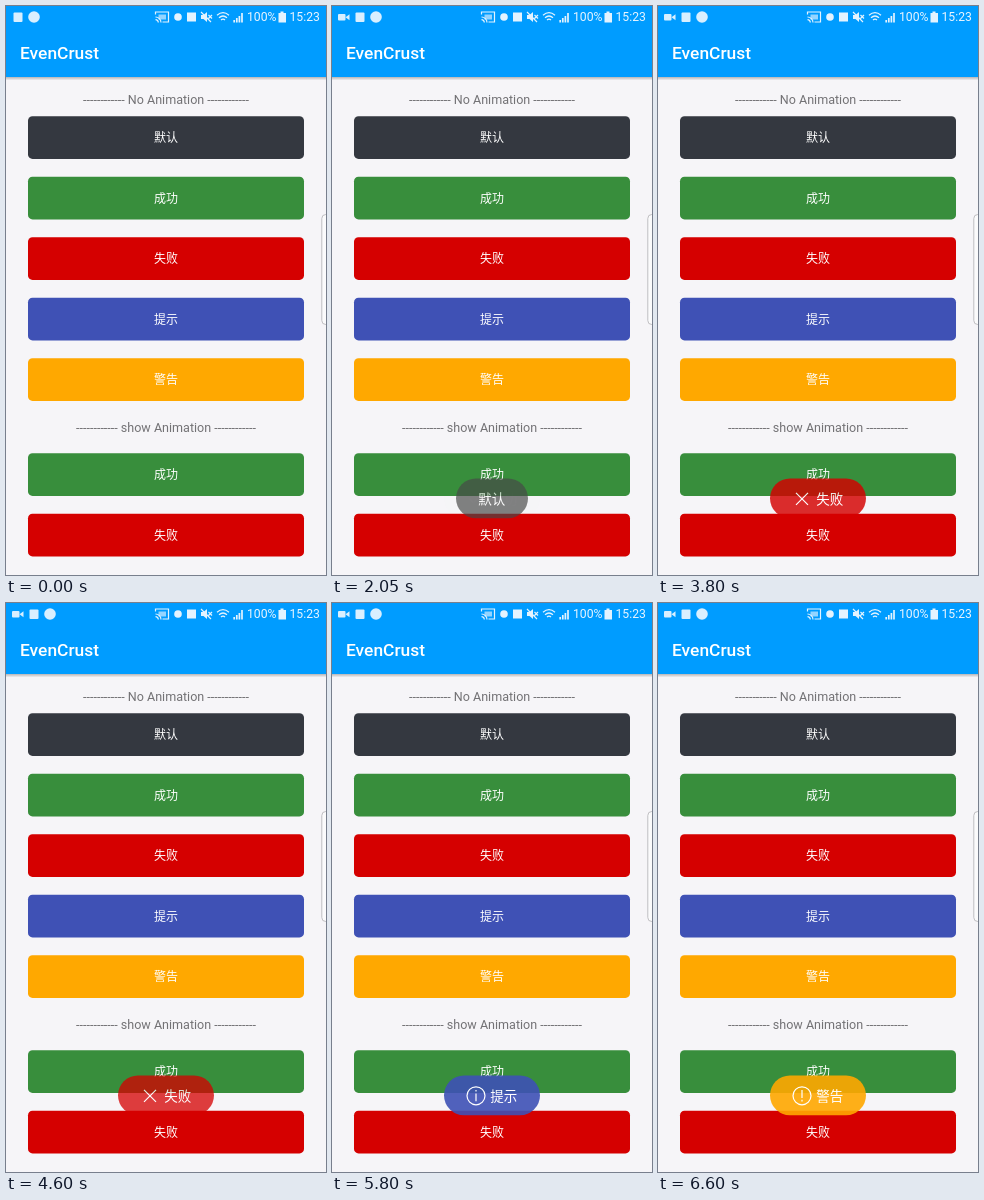
An HTML page for the animation above (6650 ms loop, 320 px wide and 569 px high).

```html
<!DOCTYPE html>
<html lang="zh-CN">
<head>
<meta charset="utf-8">
<title>Toast demo</title>
<style>
  html, body { margin: 0; width: 100%; height: 100%; overflow: hidden; background: #f6f5f8; }
  svg { display: block; width: 100%; height: 100%; }
  text { font-family: Roboto, "Noto Sans CJK SC", "Noto Sans CJK", sans-serif; }
  .label { font-size: 12.55px; fill: #737275; text-anchor: middle; }
  .button { font-size: 12px; fill: #fff; text-anchor: middle; }
  .toast { font-size: 13.5px; fill: #fff; }
  .status { font-size: 12.2px; fill: #e9f5ff; }
  .line { fill: none; stroke: #fff; stroke-width: 1.2; }
</style>
</head>
<body>
<svg id="stage" viewBox="0 0 320 569" preserveAspectRatio="none">
  <defs>
    <linearGradient id="shade" x2="0" y2="1">
      <stop offset="0" stop-color="#000" stop-opacity=".26"/>
      <stop offset="1" stop-color="#000" stop-opacity="0"/>
    </linearGradient>
  </defs>
  <rect width="320" height="569" fill="#f6f5f8"/>
  <rect y="71" width="320" height="3.5" fill="url(#shade)"/>
  <rect width="320" height="71" fill="#009cff"/>
  <text x="14" y="53" font-size="17.4" font-weight="500" fill="#fff">EvenCrust</text>

  <g id="camera" fill="#d9efff">
    <rect x="6" y="8" width="7.5" height="6.5" rx="1"/>
    <path d="M13.5 11.2 17.5 8.3V14.2Z"/>
  </g>
  <g id="notices" fill="#d9efff">
    <rect x="7.5" y="6.5" width="9" height="9.5" rx="1"/>
    <circle cx="28" cy="11" r="5.8"/>
  </g>
  <g fill="none" stroke="#e3f3ff" stroke-width="1.2">
    <path d="M149.5 8.5V6H162.5V16H156.5M149.5 11A5.5 5.5 0 0 1 155 16.5M149.5 13.7A2.8 2.8 0 0 1 152.3 16.5"/>
    <rect x="152.5" y="8.5" width="7.5" height="5" fill="#e3f3ff" stroke="none" opacity=".65"/>
    <circle cx="172" cy="11" r="3.8" fill="#e3f3ff" stroke="none"/>
    <rect x="181" y="6.5" width="9" height="9" fill="#e3f3ff" stroke="none"/>
    <path d="M195 9H197.5L201 6V16L197.5 13H195Z" fill="#e3f3ff" stroke="none"/>
    <path d="M195 6 205 16M202.5 9 206 12.5M206 9 202.5 12.5"/>
    <path d="M211 9.3Q217 4 223 9.3M213 11.8Q217 8.2 221 11.8M215 14Q217 12.2 219 14"/>
    <path d="M228.2 16.5V14M230.8 16.5V12M233.4 16.5V10M236 16.5V7" stroke-width="1.7"/>
    <path d="M274.5 5.5H277.5V7H280V16.5H272.5V7H274.5Z" fill="#e3f3ff" stroke="none"/>
  </g>
  <text class="status" x="241" y="15.3">100%</text>
  <text class="status" x="283.5" y="15.3">15:23</text>

  <text class="label" x="160" y="98">------------ No Animation ------------</text>
  <text class="label" x="160" y="426">------------ show Animation ------------</text>
  <g id="buttons"></g>
  <rect x="315.8" y="208.5" width="9" height="110" rx="4" fill="#fbfbfc" stroke="#b9b8bb" stroke-width=".9"/>
  <g id="toasts"></g>
</svg>
<script>
  const LOOP = 6650, FADE = 500, TOAST_DELAY = 250, TOAST_ALPHA = 0.9;
  const byId = id => document.getElementById(id);

  const ring = '<circle class="line" cx="144" cy="492.8" r="9"/>';
  const kinds = [
    { name: '默认', color: '#343840', toast: '#494949', tap: 200, icon: '' },
    { name: '成功', color: '#388e3c', tap: 1800,
      icon: '<path class="line" d="M137.5 492.8 141.5 496.8 149.5 488.2"/>' },
    { name: '失败', color: '#d50000', tap: 3200,
      icon: '<path class="line" d="M138 486.8 150 498.8M150 486.8 138 498.8"/>' },
    { name: '提示', color: '#3f51b5', tap: 4400,
      icon: ring + '<path class="line" d="M144 490.5V498.2M144 487V488.6"/>' },
    { name: '警告', color: '#ffa800', tap: 5800,
      icon: ring + '<path class="line" d="M144 487V495M144 496.8V498.4"/>' }
  ];

  function buttonMarkup({ name, color }, y) {
    const box = `<rect x="22" y="${y}" width="276" height="42.7" rx="4.5"`;
    return `<g>${box} fill="${color}"/>${box} class="press" opacity="0"/>
      <text class="button" x="160" y="${y + 26.2}">${name}</text></g>`;
  }

  function toastMarkup({ name, color, toast, icon }) {
    const width = icon ? 96 : 72;
    return `<g><rect x="${160 - width / 2}" y="472.4" width="${width}" height="39.8" rx="19.9"
      fill="${toast || color}" opacity="${TOAST_ALPHA}"/>${icon}
      <text class="toast" x="${icon ? 158.3 : 146.3}" y="497.6">${name}</text></g>`;
  }

  byId('buttons').innerHTML =
    kinds.map((kind, i) => buttonMarkup(kind, 110.2 + i * 60.5)).join('') +
    [1, 2].map((k, i) => buttonMarkup(kinds[k], 447.2 + i * 60.5)).join('');
  byId('toasts').innerHTML = kinds.map(toastMarkup).join('');

  const presses = document.querySelectorAll('.press');
  const toasts = byId('toasts').children;
  const progress = (t, start, length) => Math.min(1, Math.max(0, (t - start) / length));
  const easeOut = p => 1 - (1 - p) ** 2;

  function draw(t) {
    const slide = easeOut(progress(t, 50, 400));
    byId('camera').setAttribute('opacity', slide);
    byId('notices').setAttribute('transform', `translate(${16 * slide} 0)`);

    kinds.forEach(({ tap }, i) => {
      const held = t >= tap + 40 && t < tap + 160;
      presses[i].setAttribute('opacity', held ? 0.11 : 0);
      const enter = easeOut(progress(t, tap + TOAST_DELAY, FADE));
      const next = kinds[i + 1];
      const leave = next ? progress(t, next.tap, FADE) ** 2 : 0;
      toasts[i].setAttribute('opacity', enter * (1 - leave));
    });
  }

  const start = performance.now();
  function tick() {
    draw((performance.now() - start) % LOOP);
    requestAnimationFrame(tick);
  }
  tick();
</script>
</body>
</html>
```
